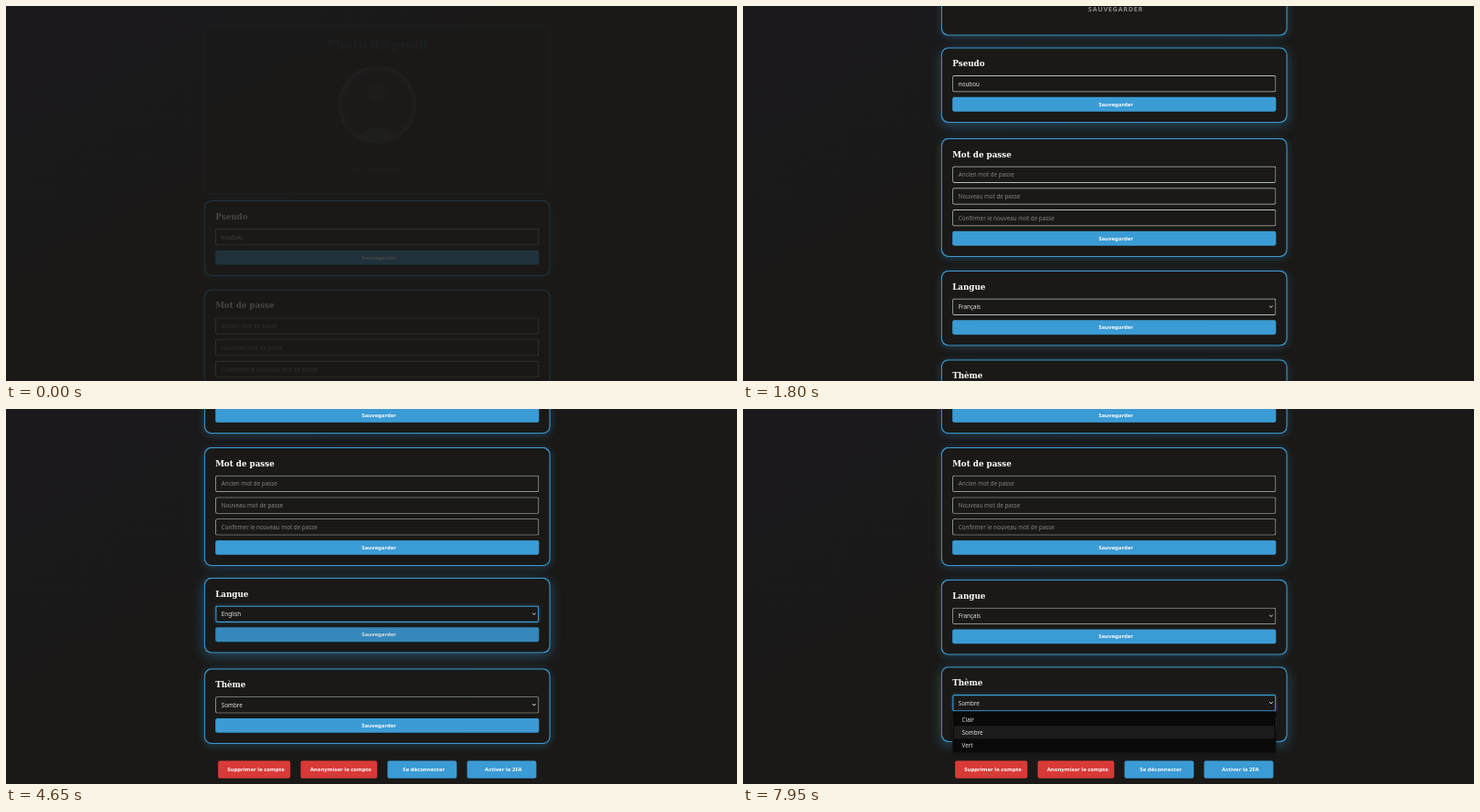
An HTML page that plays this animation: 800x411 px, repeating every 8000 ms.

```html
<!DOCTYPE html>
<html lang="fr">
<head>
<meta charset="utf-8">
<title>Profil</title>
<style>
  :root { --blue: #3b9bd4; --line: #b4bdb9; }
  html, body { margin: 0; width: 100%; height: 100%; overflow: hidden; background: #1a1917; }
  /* A 1920 px wide page shown at 800 px. */
  #stage { position: absolute; width: 1920px; height: 986.4px; overflow: hidden;
    transform: scale(.4166667); transform-origin: 0 0;
    background: linear-gradient(150deg, #1b191d 0, #1a1917 45%);
    font: 15px/44px "Noto Sans", sans-serif; color: #e4e4e4; }
  #stage div { position: absolute; box-sizing: border-box; white-space: nowrap; }
  #page { left: 0; top: 0; width: 1920px; }
  .card { left: 520px; width: 910px; border-radius: 20px; background: #1a1917; }
  h2, h1 { position: absolute; margin: 0; font-family: "DejaVu Serif", serif; font-weight: 700; }
  h2 { left: 30px; top: 29px; font-size: 21px; line-height: 28px; color: #fff; }
  h1 { left: 0; top: 34px; width: 100%; text-align: center; font-size: 32px; line-height: 38px; color: var(--blue); }
  .field, .save { left: 30px; width: 850px; border-radius: 5px; }
  .field { height: 44px; padding-left: 16px; box-shadow: inset 0 0 0 2px var(--line); }
  .field.hint { color: #858585; }
  .field.focus { box-shadow: inset 0 0 0 3px var(--blue), 0 0 8px rgba(59,155,212,.5); }
  .field svg { position: absolute; right: 7px; top: 17px; width: 12px; height: 10px; fill: none; stroke: #ddd; }
  .save, .action { background: var(--blue); color: #fff; font-weight: 600; font-size: 14.4px;
    text-align: center; padding-left: 9px; }
  .save { height: 38px; line-height: 38px; }
  .action { top: 1497.5px; height: 46px; line-height: 46px; border-radius: 5px; }
  .danger { background: #d93a38; }
  .menu { left: 30px; top: 118px; width: 850px; padding: 4px; background: #090909;
    box-shadow: inset 0 0 0 1px #262626, 0 5px 12px rgba(0,0,0,.4); }
  #stage .menu div { position: static; height: 34px; line-height: 34px; padding-left: 21px; }
  .menu .lit { background: #1c1c1c; }
  #avatar, #veil { border-radius: 50%; }
  #avatar { left: 352px; top: 108px; width: 206px; height: 206px; overflow: hidden;
    background: radial-gradient(circle at 50% 35%, #777 0 22px, transparent 24px),
      radial-gradient(circle at 50% 108%, #999 0 58px, transparent 60px),
      radial-gradient(circle, #484848 0 86px, #a8a8a8 98px 103px); }
  #veil { inset: 0; background: rgba(59,155,212,.93); color: #fff; text-align: center;
    font: 700 18.3px/23px "DejaVu Serif", serif; padding-top: 80px; }
  #upload { left: 0; top: 356px; width: 100%; text-align: center; color: #8b8b8b;
    font-size: 17.5px; font-weight: 600; letter-spacing: 1.6px; padding-left: 8px; }
</style>
</head>
<body>
<div id="stage"><div id="page"></div></div>
<script>
const LOOP = 8000, SCROLL = 572.6, LIFT = 5, RISE = 100;
const page = document.getElementById('page');
const translated = [];

const clamp = x => Math.max(0, Math.min(1, x));
const smooth = x => { x = clamp(x); return x * x * (3 - 2 * x); };
const within = (t, from, to) => t >= from && t < to;
// Eased 0 → 1 at `from`, back to 0 at `to`.
const pulse = (t, from, to, d = 180) => smooth((t - from) / d) - smooth((t - to) / d);

function add(parent, className, style = {}, text = '', tag = 'div') {
  const el = parent.appendChild(document.createElement(tag));
  el.className = className;
  for (const key in style) el.style[key] = typeof style[key] === 'number' ? style[key] + 'px' : style[key];
  if (Array.isArray(text)) translated.push([el, text]);
  else el.textContent = text;
  return el;
}

function makeCard(top, height, title, hover, lead) {
  const el = add(page, 'card', { top, height });
  if (title) add(el, '', {}, title, 'h2');
  return { el, hover, lead };
}
const addSave = (card, top) => add(card.el, 'save', { top }, ['Sauvegarder', 'Save']);

function addSelect(card, options) {
  const field = add(card.el, 'field', { top: 74 });
  const value = add(field, '', { left: 16 });
  field.insertAdjacentHTML('beforeend', '<svg viewBox="0 0 5 4"><path d="M.7 .8 2.5 2.7 4.3 .8"/></svg>');
  const save = addSave(card, 131);
  const menu = add(card.el, 'menu');
  const items = options.map(text => add(menu, '', {}, text));
  return { field, value, save, menu, items };
}

const photo = makeCard(-44, 447.5, null, [850, 1620], 134);
add(photo.el, '', {}, 'Photo de profil', 'h1');
const avatar = add(photo.el, '');
avatar.id = 'avatar';
const veil = add(avatar, '');
veil.id = 'veil';
veil.innerHTML = 'Cliquer pour<br>changer';
add(photo.el, '', {}, 'SAUVEGARDER').id = 'upload';

const nickname = makeCard(438.5, 199, 'Pseudo', [1650, 1960], 276);
add(nickname.el, 'field', { top: 74 }, 'noubou');
addSave(nickname, 131);

const password = makeCard(672.5, 313, ['Mot de passe', 'Password'], [1990, 3350], 276);
[['Ancien mot de passe', 'Current password'],
 ['Nouveau mot de passe', 'New password'],
 ['Confirmer le nouveau mot de passe', 'Confirm new password']]
  .forEach((text, i) => add(password.el, 'field hint', { top: 74 + 57 * i }, text));
addSave(password, 245);

const language = makeCard(1020.5, 199, ['Langue', 'Language'], [3400, 7350], 276);
const theme = makeCard(1254.5, 199, ['Thème', 'Theme'], [7400, 9000], 276);
const languages = ['Français', 'English', 'Русский', 'Brezhoneg'];
const languageSelect = addSelect(language, languages);
const themeSelect = addSelect(theme, [['Clair', 'Light'], ['Sombre', 'Dark'], ['Vert', 'Green']]);
translated.push([themeSelect.value, ['Sombre', 'Dark']]);
language.el.style.zIndex = 2;

const actions = [
  [['Supprimer le compte', 'Delete Account'], 'danger', 190],
  [['Anonymiser le compte', 'Anonymize account'], 'danger', 201],
  [['Se déconnecter', 'Logout'], '', 182],
  [['Activer la 2FA', 'Enable 2FA'], '', 182]
].map(([text, kind, width]) => ({ el: add(page, 'action ' + kind, {}, text), widths: [width, 182] }));

let shownLanguage = -1;
function translate(lang) {
  if (lang === shownLanguage) return;
  shownLanguage = lang;
  for (const [el, text] of translated) el.textContent = text[lang];
  const gap = 27;
  let x = 975 - (actions.reduce((sum, a) => sum + a.widths[lang], 0) + 3 * gap) / 2;
  for (const { el, widths } of actions) {
    el.style.left = x + 'px';
    el.style.width = widths[lang] + 'px';
    x += widths[lang] + gap;
  }
}

function drawSelect(select, focused, open, lit) {
  select.field.classList.toggle('focus', focused);
  select.menu.style.display = open ? 'block' : 'none';
  select.items.forEach((item, i) => item.classList.toggle('lit', i === lit));
}

function render(t) {
  translate(+within(t, 4900, 7100));
  page.style.transform = `translateY(${-SCROLL * smooth((t - 1255) / 1000)}px)`;

  for (const { el, hover, lead } of [photo, nickname, password, language, theme]) {
    const h = pulse(t, ...hover), shown = smooth((t + lead) / 800);
    el.style.opacity = shown ** 1.3;
    el.style.transform = `translateY(${RISE * (1 - shown) - LIFT * h}px)`;
    el.style.boxShadow = `inset 0 0 0 3px var(--blue), 0 ${4 + 4 * h}px ${20 + 12 * h}px rgba(59,155,212,${.3 + .1 * h})`;
  }

  const over = pulse(t, 950, 1480, 220);
  avatar.style.transform = `scale(${1 + .05 * over})`;
  avatar.style.boxShadow = `0 0 ${24 * over}px rgba(59,155,212,${.6 * over})`;
  veil.style.opacity = over;

  const firstOpen = within(t, 3650, 4150), secondOpen = within(t, 5800, 6400);
  const pickedEnglish = within(t, 4150, 6400);
  const lit = firstOpen ? +(t >= 3900) : +(t < 6000);
  drawSelect(languageSelect, within(t, 3650, 7680), firstOpen || secondOpen, lit);
  languageSelect.value.textContent = languages[+pickedEnglish];
  const press = pulse(t, 4380, 5500) + pulse(t, 6650, 7300);
  languageSelect.save.style.filter = `brightness(${1 - .12 * press})`;

  drawSelect(themeSelect, t >= 7700, t >= 7700, 1);
}

function frame() {
  render(performance.now() % LOOP);
  requestAnimationFrame(frame);
}
frame();
</script>
</body>
</html>
```
